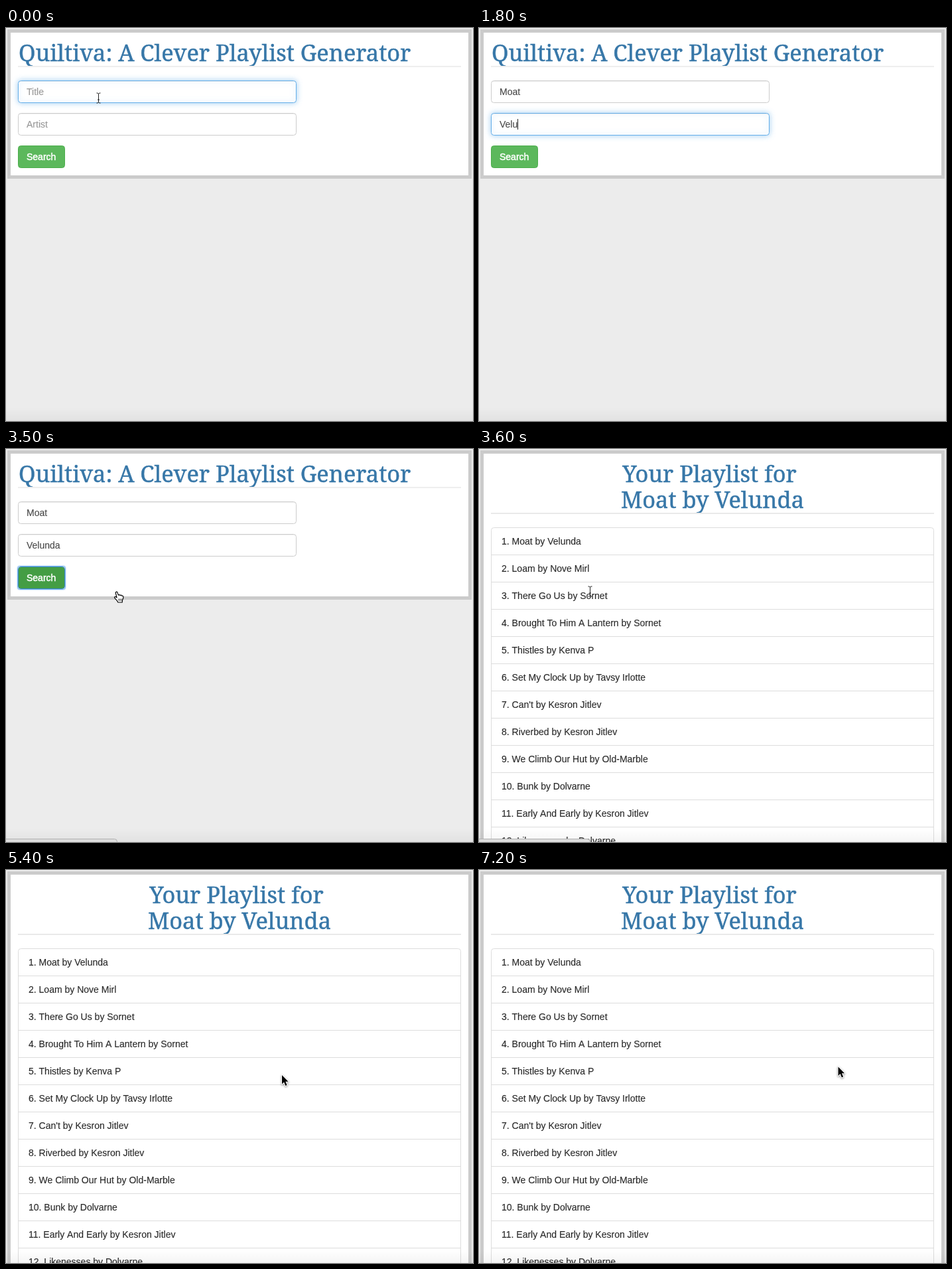
Recreate the animation shown at these times as an HTML page with a canvas. Size 704 by 592 pixels, loop 8.3 s.

```html
<!DOCTYPE html>
<html lang="en">
<head>
<meta charset="utf-8">
<title>Playlist generator</title>
<style>
  html, body { margin: 0; width: 704px; height: 592px; overflow: hidden; background: #ececec; }
  canvas { display: block; }
</style>
</head>
<body>
<canvas id="stage" width="704" height="592"></canvas>
<script>
const ctx = document.getElementById('stage').getContext('2d');
const W = 704, H = 592, LOOP = 8300, STEP = 100;
const SANS = '14px "Liberation Sans", Arial, sans-serif';
const SERIF = '34.4px "Noto Serif", Georgia, serif';
const BLUE = '#3777a8';

const SONG = 'Moat', SINGER = 'Velunda';
const SONGS = [
  `${SONG} by ${SINGER}`,
  'Loam by Nove Mirl',
  'There Go Us by Sornet',
  'Brought To Him A Lantern by Sornet',
  'Thistles by Kenva P',
  'Set My Clock Up by Tavsy Irlotte',
  "Can't by Kesron Jitlev",
  'Riverbed by Kesron Jitlev',
  'We Climb Our Hut by Old-Marble',
  'Bunk by Dolvarne',
  'Early And Early by Kesron Jitlev',
  'Likenesses by Dolvarne'
];

// Times at which each letter appears
const SONG_KEYS = [700, 900, 1000, 1100];
const SINGER_KEYS = [1500, 1700, 1700, 1800, 1900, 2000, 2100];

const PRESS = 2700, RELEASE = 2900, PAGE_LOAD = 3600;

// Pointer hotspot: time, x, y
const POINTER = [
  [0, 139, 105], [100, 139, 105], [500, 138, 99], [2200, 138, 99],
  [2600, 57, 185], [3100, 57, 185], [3500, 167, 215], [3600, 167, 214],
  [4200, 167, 214], [4600, 440, 222], [4800, 333, 173], [5000, 333, 173],
  [5400, 416, 308], [5700, 416, 308], [6000, 432, 323], [6900, 432, 323],
  [7200, 541.5, 295.5]
];

const HAND = new Path2D('M2.2 1.8C2.6 .2 4.6 .2 5 1.6L6.4 5.6C7.2 4.8 8.6 5 9 6C10 5.3 11.2 5.6 11.5 6.7' +
  'C12.6 6.3 13.7 7 13.8 8.2C14 10.5 13 12 12.4 13.5L12.2 16.5H5.8C5.5 14.5 3 12.5 .8 9.8C0 8.6 1.4 7.4 2.6 8.2L4 9.4Z');
const KNUCKLES = new Path2D('M7 11V14.2M9 11V14.2M11 11V14.2');
const ARROW = new Path2D('M0 0V13.5L3.1 10.6L5.3 16L7.6 15L5.4 9.8H9.6Z');
const BEAM = new Path2D('M-3 -7.5H-1.5L0 -6.5L1.5 -7.5H3M0 -6.5V6.5M-3 7.5H-1.5L0 6.5L1.5 7.5H3M-1.5 2.5H1.5');

const ramp = (t, from, to) => Math.min(1, Math.max(0, (t - from) / (to - from)));
const mix = (a, b, k) => a + (b - a) * k;
const typed = (word, keys, t) => word.slice(0, keys.filter(k => k <= t).length);

function pointerAt(t) {
  const next = POINTER.findIndex(p => p[0] > t);
  if (next < 0) return POINTER[POINTER.length - 1].slice(1);
  const a = POINTER[next - 1], b = POINTER[next], k = ramp(t, a[0], b[0]);
  return [mix(a[1], b[1], k), mix(a[2], b[2], k)];
}

function rect(x, y, w, h, color) {
  ctx.fillStyle = color;
  ctx.fillRect(x, y, w, h);
}

// A thin outline of the same colour gives the heavier look of smoothed screen type
function text(str, x, y, color, { font = SANS, align = 'left', weight = 0.15 } = {}) {
  ctx.font = font;
  ctx.textAlign = align;
  ctx.fillStyle = ctx.strokeStyle = color;
  ctx.lineWidth = weight;
  ctx.fillText(str, x, y);
  ctx.strokeText(str, x, y);
}

function heading(str, x, y, align) {
  text(str, x, y, BLUE, { font: SERIF, align, weight: 0.5 });
}

function box(x, y, w, h, radius, fill, stroke, lineWidth = 1) {
  ctx.beginPath();
  ctx.roundRect(x, y, w, h, radius);
  if (fill) { ctx.fillStyle = fill; ctx.fill(); }
  if (stroke) { ctx.strokeStyle = stroke; ctx.lineWidth = lineWidth; ctx.stroke(); }
}

function glow(color, blur) {
  ctx.shadowColor = color;
  ctx.shadowBlur = blur;
}

function panel(height) {
  rect(0, 0, W, H, '#ececec');
  rect(2, 2, 700, height, '#cbcbcb');
  rect(7, 7, 690, height - 10, '#fff');
}

function input(y, value, placeholder, focus, caret) {
  const border = `rgb(${mix(204, 102, focus)},${mix(204, 175, focus)},${mix(204, 233, focus)})`;
  ctx.save();
  if (focus > 0) glow(`rgba(102,175,233,${0.6 * focus ** 3})`, 8);
  box(18.5, y + 0.5, 419, 33, 4, '#fff', border);
  ctx.restore();
  rect(21, y + 1, 414, 1, 'rgba(0,0,0,.06)');
  text(value || placeholder, 31, y + 22, value ? '#4a4a4a' : '#999');
  if (caret) rect(Math.round(31 + (value ? ctx.measureText(value).width : 0)), y + 9, 1, 16, '#222');
}

function button(t) {
  const pressed = t >= PRESS && t < RELEASE, focused = t >= PRESS;
  const fill = pressed ? '#398439' : t >= 2600 ? '#449d44' : '#5cb85c';
  if (focused) {
    ctx.save();
    glow('rgba(90,165,240,.8)', 2);
    box(17.5, 176.5, 72, 35, 3, null, '#7db8f0');
    ctx.restore();
  }
  box(18.5, 177.5, 70, 33, 4, fill, focused ? '#3a86c0' : '#4cae4c');
  text('Search', 31, 199, '#fff', { weight: 0.5 });
}

function searchPage(t) {
  panel(225);
  heading('Quiltiva: A Clever Playlist Generator', 19, 50, 'left');
  rect(18, 57, 668, 2, '#eeeeee');
  const moved = ramp(t, 1100, 1300);
  input(79, typed(SONG, SONG_KEYS, t), 'Title', 1 - moved, t >= 100 && t < 1200);
  input(128, typed(SINGER, SINGER_KEYS, t), 'Artist', moved * (1 - ramp(t, PRESS, RELEASE)), t >= 1200 && t < 2500);
  button(t);
}

function playlistPage() {
  panel(H + 20);
  heading('Your Playlist for', 347.5, 50, 'center');
  heading(`${SONG} by ${SINGER}`, 352, 89, 'center');
  rect(18, 96, 668, 2, '#e9e9e9');
  box(18.5, 118.5, 667, H, 4, '#fff', '#ddd');
  SONGS.forEach((song, i) => {
    const y = 118 + 41 * i;
    if (i) rect(19, y, 666, 1, '#ddd');
    text(`${i + 1}. ${song}`, 34, y + 26, '#2b2b2b');
  });
}

function bottomShade() {
  const shade = ctx.createLinearGradient(0, 572, 0, H);
  shade.addColorStop(0, 'rgba(0,0,0,0)');
  shade.addColorStop(1, 'rgba(0,0,0,.045)');
  rect(0, 572, W, 20, shade);
}

function statusBar(t) {
  const alpha = ramp(t, 3300, 3500) * (1 - ramp(t, 3800, 4100));
  if (!alpha) return;
  ctx.globalAlpha = alpha;
  box(-4.5, 587.5, 172, 20, 4, '#dedede', '#b0b0b0');
  ctx.globalAlpha = 1;
}

function pointer(t) {
  if (t >= 700 && t < 2300) return;
  const [x, y] = pointerAt(t);
  ctx.save();
  ctx.lineJoin = 'round';
  if (t >= 2500 && t < PAGE_LOAD) {
    ctx.translate(x - 4, y - 0.5);
    ctx.fillStyle = '#fff';
    ctx.strokeStyle = '#000';
    ctx.lineWidth = 1.2;
    ctx.fill(HAND);
    ctx.stroke(HAND);
    ctx.lineWidth = 0.8;
    ctx.stroke(KNUCKLES);
  } else if (t < 4300) {
    ctx.translate(Math.round(x) + 0.5, Math.round(y) + 0.5);
    ctx.strokeStyle = '#222';
    ctx.lineWidth = 1;
    ctx.stroke(BEAM);
  } else {
    ctx.translate(x, y + 1);
    ctx.save();
    glow('rgba(0,0,0,.45)', 3);
    ctx.shadowOffsetY = 1;
    ctx.strokeStyle = '#fff';
    ctx.lineWidth = 2;
    ctx.stroke(ARROW);
    ctx.restore();
    ctx.fillStyle = '#000';
    ctx.fill(ARROW);
  }
  ctx.restore();
}

function draw(t) {
  if (t < PAGE_LOAD) searchPage(t);
  else playlistPage();
  bottomShade();
  statusBar(t);
  pointer(t);
}

const start = performance.now();
function tick() {
  const t = (performance.now() - start) % LOOP;
  draw(Math.floor(t / STEP) * STEP);
  requestAnimationFrame(tick);
}
tick();
</script>
</body>
</html>
```
